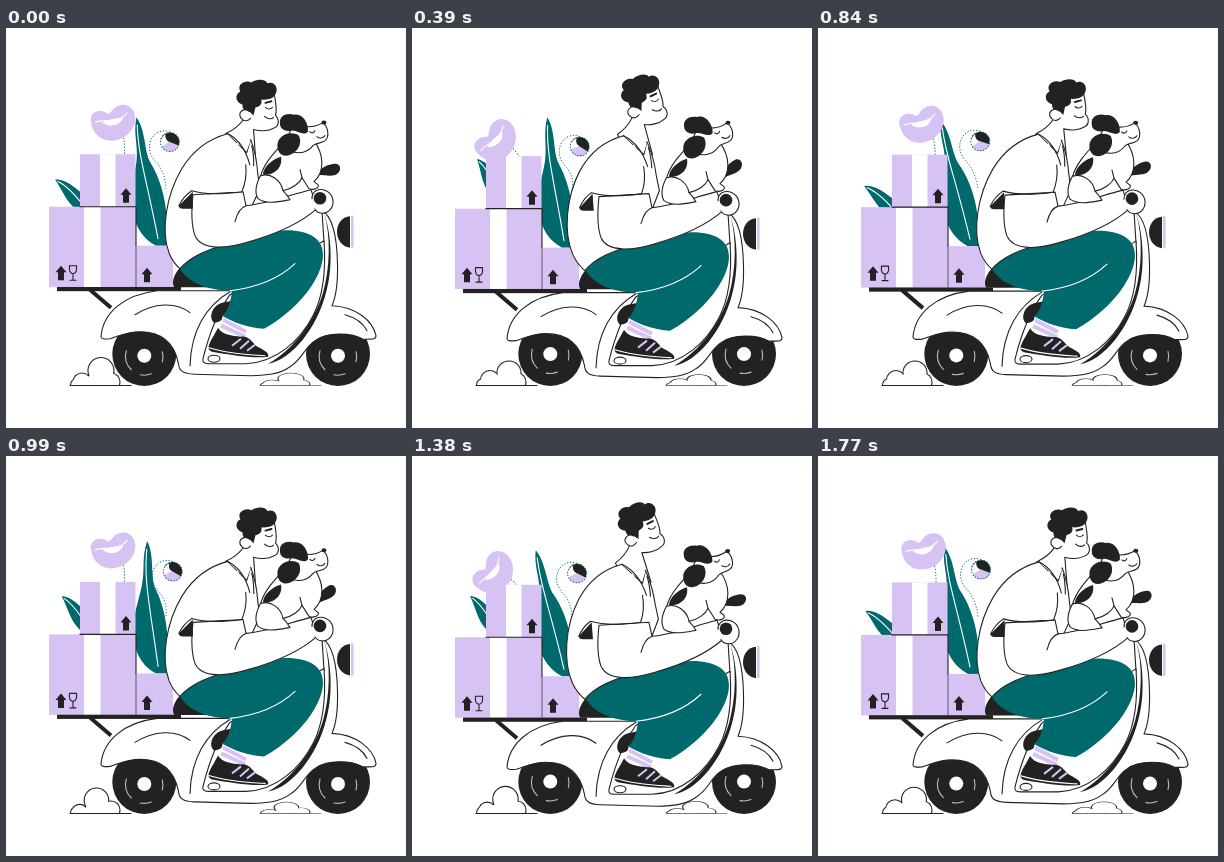
An HTML page that plays this animation: 400 px wide and 400 px high, repeating every 1800 ms.

```html
<!DOCTYPE html>
<html lang="en">
<head>
<meta charset="utf-8">
<title>Scooter delivery</title>
<style>
html, body { margin: 0; width: 100%; height: 100%; overflow: hidden; background: #fff; }
svg { display: block; width: 100vw; height: 100vh; }
.o { fill: #fff; stroke: #222; stroke-width: 1.1; stroke-linejoin: round; stroke-linecap: round; }
.l { fill: none; stroke: #222; stroke-width: 1.1; stroke-linecap: round; }
.w { fill: none; stroke: #fff; stroke-width: 1.1; stroke-linecap: round; }
.d { fill: #222; }
.p { fill: #d7c3f3; }
.t { fill: #00696b; }
.white { fill: #fff; }
.dots { fill: none; stroke: #00696b; stroke-width: 1; stroke-dasharray: 1.2 1.8; }
</style>
</head>
<body>
<svg viewBox="0 0 400 400">
  <defs>
    <clipPath id="ground"><rect y="300" width="400" height="57.5"/></clipPath>
    <path id="arrow" d="M0 -7.5 L5.5 -1 H3 V7 H-3 V-1 H-5.5Z" class="d"/>
    <g id="wheel">
      <circle r="32" class="d"/>
      <g class="hub">
        <circle r="7" class="white"/>
        <path d="M-18 -5 A19 19 0 0 0 -13 14 M18 6 A19 19 0 0 0 18 -4 M-4 19 A19 19 0 0 0 7 18" class="w" opacity=".7"/>
      </g>
    </g>
    <g id="puff">
      <g id="puffs" clip-path="url(#ground)"></g>
      <path d="M64 357.5 H125" class="l"/>
    </g>
  </defs>
  <rect width="400" height="400" fill="#fff"/>
  <use href="#puff"/>
  <use href="#puff" transform="translate(190 357.5) scale(1 .45) translate(0 -357.5)"/>

  <g id="body">
    <g id="leftLeaf">
      <path class="t" d="M49 151 C57 150 66 156 75 164 C95 184 106 202 125 214 L107 218 C88 208 82 190 70 181 C60 173 56 161 49 151Z"/>
      <path class="w" d="M52 153 C64 159 78 176 92 198"/>
    </g>
    <path id="leaf" class="t"/>
    <path id="vein" class="w"/>
    <path id="budStem" class="dots"/>
    <g id="bud">
      <circle r="9.5" class="d"/>
      <path d="M-9 3 L0 0 L8.5 4 A9.5 9.5 0 0 1 -9 3Z" class="p"/>
      <path d="M-9.8 -1 C-8 -5 -6 -7 -4 -8 C-5 -4 -3 -1 0 0 L-9 4Z" class="white"/>
      <circle r="9.5" class="dots"/>
    </g>
    <g id="flower">
      <path class="dots" d="M117 106 C121 116 117 130 120 142"/>
      <path class="p" d="M86 94 C83 83 95 78 103 85 C108 83 108 77 117 76 C127 75 133 86 129 96 C126 104 120 109 112 111 C99 114 88 107 86 94Z"/>
      <path class="white" d="M97 93 C104 99 115 97 118 89 C112 89 103 91 97 93Z"/>
      <path class="w" d="M90 93 C98 89 112 96 122 84"/>
    </g>

    <rect x="74" y="125.5" width="55.5" height="53" class="p"/>
    <rect x="94" y="125.5" width="15.5" height="53" class="white"/>
    <rect x="43" y="178" width="87" height="80.5" class="p"/>
    <rect x="78" y="178" width="16.5" height="80.5" class="white"/>
    <path class="l" d="M74 178 H130 V217"/>
    <rect x="130" y="217" width="37" height="41.5" class="p"/>
    <path class="l" d="M130 217 V258" stroke-opacity=".6"/>
    <use href="#arrow" x="120" y="167"/>
    <use href="#arrow" x="55" y="244.5"/>
    <use href="#arrow" x="141" y="246.5"/>
    <path class="l" d="M63.5 237 H70.5 C71 242 70 245 67 245 C64 245 63 242 63.5 237Z M67 245 V251 M64 251.5 H70"/>
    <path d="M84 261 L105 279" stroke="#222" stroke-width="4"/>
    <rect x="51" y="258.3" width="124" height="4.2" class="d"/>
  </g>

  <use href="#wheel" x="138.3" y="326"/>
  <use href="#wheel" x="332" y="326"/>

  <g id="rider">
    <path class="d" d="M331 203 C331 195 336 188 344 187.5 V219 C336 218 331 211 331 203Z"/>
    <rect x="345" y="187" width="2.6" height="32" class="p"/>

    <path class="o" d="M95 308 C97 284 118 266 151 262 L226 262 L318 214 L316 182 C327 188 331 210 331.5 235 C332 255 329 270 326 277 C350 278 367 292 370 307 C370 311 366 310.5 357 310.5 C346 304 321 303 309 312 C298 319 297 330 284 338 C273 346 260 346.5 245 347 L188 345.5 C177 345 173 342 172.5 335 C168 312 153 303 134 303 C119 303 112 308 104 310 Q95 311 95 308Z"/>
    <path class="l" d="M129 286 C148 274 170 273 184 284 M224 263 C200 277 185 302 184 337 M339 286 C350 289 357 294 361 302"/>
    <path class="o" d="M224 266 C211 284 203 306 197 330 Q196 335 202 335 L240 335 C270 334 294 312 307 287 C318 266 320 240 318 212Z"/>
    <path class="d" d="M318 184 C326 207 327 240 320 264 C311 299 286 331 262 335 C288 321 309 291 317 264 C324 240 325 207 318 184Z"/>
    <ellipse cx="208" cy="330" rx="6" ry="3.5" class="o"/>

    <path class="d" d="M216 274 C206 277 202 289 208 294 C216 294 223 285 226 272Z"/>
    <path class="white" d="M217 286 L244 299 L243 313 L213 302Z"/>
    <path d="M217 291 L240 303 M215 297 L239 308" stroke="#d7c3f3" stroke-width="4"/>
    <path class="d" d="M212 299 C216 306 226 307 235 308 C242 307 245 312 250 317 C257 321 264 324 262 328 C247 330 224 326 206 323 C198 320 206 311 212 299Z"/>
    <path class="w" d="M203 319 C221 325 243 326 259 327"/>
    <path d="M226 317 L235 310 M234 320 L243 312 M241 322 L249 316" stroke="#d7c3f3" stroke-width="2"/>

    <path class="d" d="M177 236 C169 243 165 252 168 258.5 H225 V263 L240 250Z"/>
    <path class="t" d="M174 240 C186 224 204 220 228 212 C260 201 292 197 309 209 C322 219 318 239 305 258 C295 273 278 289 258 300 C242 299 228 294 216 287 C222 283 225 272 226 262 C205 262 184 256 174 240Z"/>
    <path class="w" d="M224 262 C251 259 274 249 289 235"/>

    <g id="head">
      <path class="o" d="M238 91 C233 98 227 102 220 105 L222 128 L250 132 L248 101 C254 103 263 103 268 100 C274 98 274 91 270 87 C272 81 270 74 269 66 L250 60 L242 74Z"/>
      <path class="d" d="M237 76 C230 74 229 66 235 63 C231 56 240 51 246 54 C252 50 261 51 262 55 C269 52 274 60 270 66 C268 71 260 72 256 71 C257 77 253 78 250 79 L248 87 L244 83 C240 84 237 81 237 76Z"/>
      <path class="o" d="M244 83 C238 78 231 85 236 90 C239 94 243 92 245 90"/>
      <path class="l" d="M260 79 C262 81 265 81 267 79 M259 88 C262 91 266 91 268 89"/>
      <path class="l" d="M260 74.5 L266 73" style="stroke-width:2"/>
    </g>

    <g id="torso">
      <path class="o" d="M222 105 C203 110 187 122 176 140 C160 167 155 202 163 224 Q167 234 174 240 C188 224 211 219 230 212 L254 160 L252 145 C251 130 248 119 245 111 L241 124Z"/>
      <path class="white" d="M223 106 L241 122 L245 112 L232 108Z"/>
      <path class="l" d="M222 105 C234 111 241 124 244 136 M246 117 C248 124 248 130 248 137"/>
    </g>
    <path class="o" d="M187 166 C185 184 185 196 189 207 C196 222 220 220 243 213 C268 206 293 196 311 180 L305 161 C284 166 263 175 240 177 L237 163Z"/>
    <path class="l" d="M240 177 C234 179 231 185 229 193"/>
    <g id="sleeve">
      <path class="d" d="M187 163 L173 177 Q173 180 177 180 L187 180Z"/>
      <path class="white" d="M193 132 L187 163 L236 163 L243 138 L232 114Z"/>
      <path class="l" d="M173 177 C176 171 180 166 186 162 C202 167 222 165 236 163 C240 154 241 146 240 136"/>
    </g>

    <g id="tail"><path class="d" d="M311 146 C313 139 319 134 327 132 C333 131 335 139 329 143 C323 146 317 145 311 147Z"/></g>
    <path class="o" d="M280 111 C270 122 259 133 255 146 C250 155 248 163 252 170 C260 176 273 173 284 171 C281 166 279 164 277 162 C287 160 294 154 296 149 L303 160 C308 162 314 159 312 156 L308 153 C319 143 318 126 308 112Z"/>
    <path class="d" d="M275 128 C277 139 268 147 257 146 C257 139 265 131 275 128Z"/>
    <path class="l" d="M255 147 C264 144 275 151 277 162 M296 149 L294 141"/>
    <g id="dogHead">
      <path class="o" d="M288 95 C298 99 309 99 317 94 C322 98 324 108 319 112 C315 115 310 114 307 117 C300 126 287 127 277 117Z"/>
      <path class="d" d="M274 95 C273 86 282 84 288 86 C296 84 303 94 302 103 C297 108 291 101 285 102 C279 103 274 100 274 95Z"/>
      <path class="d" d="M272 113 C275 105 286 102 293 107 C297 116 290 126 280 127 C273 127 270 120 272 113Z"/>
      <ellipse cx="318" cy="94" rx="2.5" ry="2" class="d"/>
      <path class="l" d="M304 103 C306 105 308 104 309 102 M311 108 C313 110 317 110 319 107"/>
    </g>
    <path class="o" d="M306 170 C306 162 313 159 320 162 C327 165 329 174 325 180 C320 187 311 185 309 180"/>
    <path class="white" d="M305 172 L315 165 L319 174 L310 181Z"/>
    <circle cx="314" cy="169.5" r="6.3" class="d"/>
  </g>
</svg>
<script>
const PERIOD = 900;
const el = id => document.getElementById(id);
const wave = (t, peak, period = PERIOD) => Math.cos(2 * Math.PI * (t - peak) / period);
const set = (id, name, value) => el(id).setAttribute(name, value);
const move = (id, value) => set(id, 'transform', value);

// Shifts each point of a path sideways, more towards the top.
function bend(path, sway) {
  return path.replace(/(\d+) (\d+)/g, (_, x, y) => {
    const k = Math.max(0, (217 - y) / 130) ** 1.8;
    return `${+x + 19 * sway * k} ${+y + (1 - 7 * sway) * k}`;
  });
}

const LEAF = 'M129 88 C139 102 137 122 144 134 C154 150 164 178 160 217 L150 217 C137 210 131 200 127 186 C121 170 129 145 130 130 C131 115 126 104 129 88Z';
const VEIN = 'M130 96 C131 125 140 150 152 210';

// [age in ms, x, top y, radius]
const PUFF_LIFE = [[0, 103, 347, 8], [150, 97, 333, 12], [210, 95, 329.5, 13], [450, 83, 336, 11], [660, 76, 345, 9], [900, 70, 354, 6]];

function puffAt(age) {
  const i = PUFF_LIFE.findIndex(p => p[0] > age);
  const a = PUFF_LIFE[i - 1], b = PUFF_LIFE[i];
  const u = (age - a[0]) / (b[0] - a[0]);
  const [, x, top, r] = a.map((v, j) => v + (b[j] - v) * u);
  return [x, top + r, r];
}

function drawPuffs(t) {
  const age = (t - 240 + PERIOD) % 450;
  const list = [puffAt(age), puffAt(age + 450), [71, 357, 6.5], [105, 354, 9], [88, 356, 10]];
  const circles = (grow, fill) => list.map(([x, y, r]) =>
    `<circle cx="${x}" cy="${y}" r="${r + grow}" fill="${fill}"/>`).join('');
  el('puffs').innerHTML = circles(.55, '#222') + circles(-.55, '#fff');
}

function draw(now) {
  const t = now % 1800;
  const drop = (1 - wave(t, 90)) / 2;
  const lean = (1 - wave(t, 47)) / 2;
  const leafSway = wave(t, 215);
  const budSway = wave(t, 260);
  const x = 165 + 4.5 * budSway, y = 114 + 3 * budSway;

  for (const id of ['body', 'rider']) move(id, `translate(0 ${.4 + 3 * drop})`);
  document.querySelector('.hub').setAttribute('transform', `translate(0 ${2 - 2.5 * drop})`);

  move('head', `rotate(${-13.5 * lean} 206 174)`);
  for (const id of ['torso', 'sleeve'])
    move(id, `translate(0 255) skewX(${4.6 * lean}) translate(0 -255)`);
  move('dogHead', `rotate(${-5 * lean} 292 120)`);
  move('tail', `rotate(${2 - 16 * wave(t, 390, 600)} 313 146)`);

  move('flower', `rotate(${-38 * lean} 125 142)`);
  move('leftLeaf', `rotate(${6 + 12 * wave(t, 300)} 139 198)`);
  set('leaf', 'd', bend(LEAF, leafSway));
  set('vein', 'd', bend(VEIN, leafSway));
  move('bud', `translate(${x} ${y}) rotate(${12 * budSway})`);
  set('budStem', 'd', `M${x} ${y - 10} C${x - 16} ${y - 16} ${x - 28} ${y + 4} ${x - 15} ${y + 19} Q${x - 5} ${y + 29} 160 160`);
  drawPuffs(t);
}

const start = performance.now();
function tick() {
  draw(performance.now() - start);
  requestAnimationFrame(tick);
}
tick();
</script>
</body>
</html>
```
